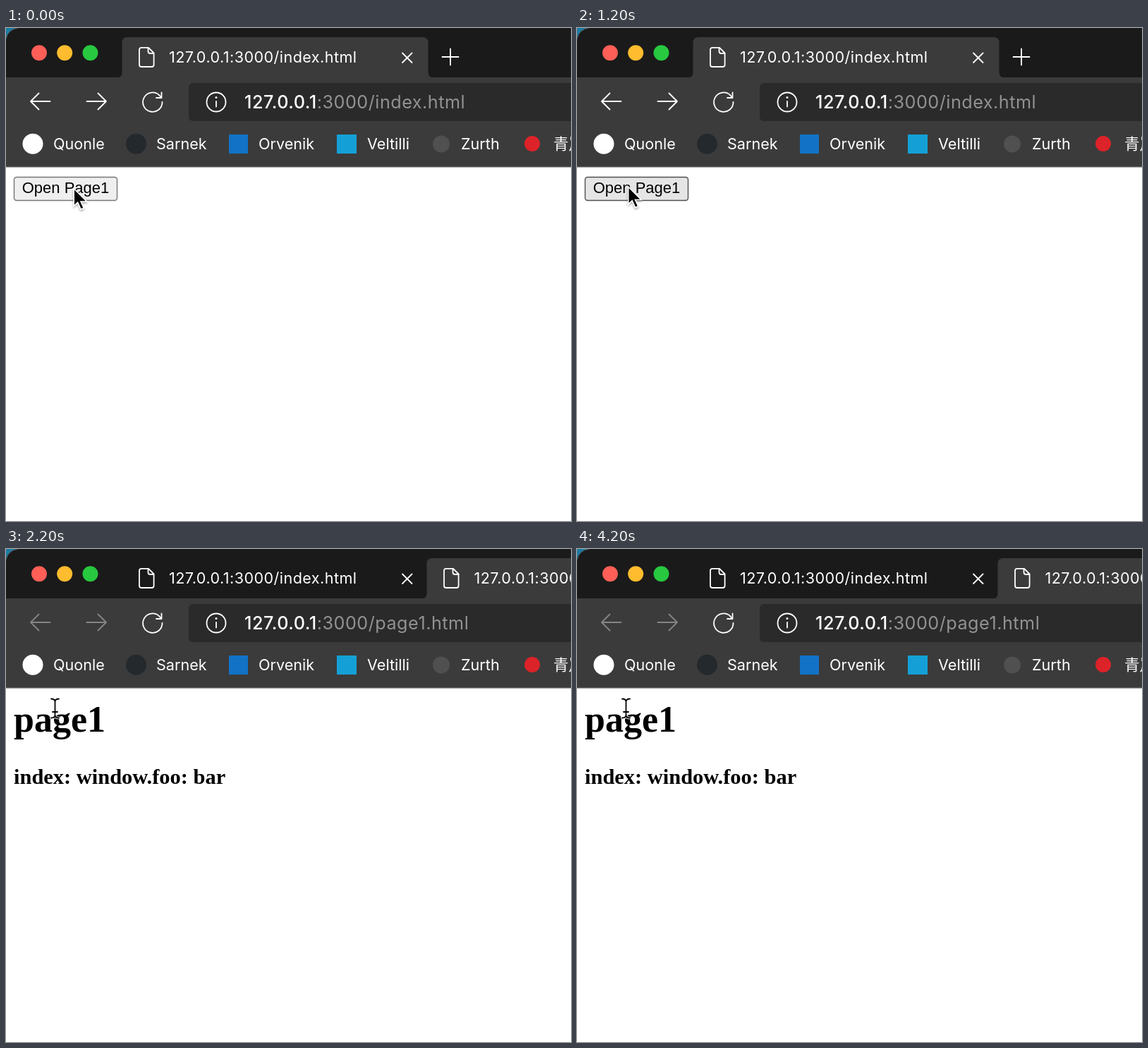
Write an HTML page that moves like this. It is 801 by 699 pixels and loops after 4600 ms.

```html
<!DOCTYPE html>
<html lang="en">
<head>
<meta charset="utf-8">
<title>Opening a page in a new tab</title>
<style>
html, body { margin: 0; width: 100%; height: 100%; overflow: hidden; background: #fff; }
svg { display: block; width: 801px; height: 699px; }
.ui { font: 400 21.6px Inter, "Noto Sans CJK SC", "Noto Sans CJK", sans-serif; fill: #fff; }
.url { letter-spacing: .02em; }
.address { font-size: 25.2px; }
.doc { font-family: "Liberation Serif", serif; font-weight: 700; }
.line { fill: none; stroke: #fff; stroke-width: 1.8; stroke-linecap: round; stroke-linejoin: round; }
</style>
</head>
<body>
<svg viewBox="0 0 801 699" xmlns="http://www.w3.org/2000/svg">
  <defs>
    <path id="file" class="line" d="M192 27.800H202L209.600 35.500V52Q209.600 55 206.600 55H192Q189 55 189 52V30.800Q189 27.800 192 27.800ZM201.500 28V33Q201.500 36 204.500 36H209"/>
    <filter id="shadow" x="-50%" y="-50%" width="200%" height="200%">
      <feDropShadow dx="0" dy="2" stdDeviation="1.6" flood-opacity=".35"/>
    </filter>
  </defs>

  <!-- Window frame -->
  <rect width="20" height="20" fill="#1a7ca3"/>
  <path d="M0 70V17Q2 2 18 0H801V70Z" fill="#1a1a1a"/>
  <path d="M0 15Q3 2 17 0" fill="none" stroke="#555" stroke-width="1"/>
  <rect y="70" width="801" height="127" fill="#3b3b3b"/>
  <rect y="196.500" width="801" height="1.500" fill="#747474"/>
  <rect id="content" y="197.600" width="801" height="502" fill="#fff"/>
  <circle cx="47" cy="35.300" r="11" fill="#ff5f57"/>
  <circle cx="83.200" cy="35.300" r="11" fill="#febc2e"/>
  <circle cx="119.500" cy="35.300" r="11" fill="#28c840"/>

  <!-- Tabs -->
  <g id="firstTab">
    <path d="M158 70.500Q164.500 70 164.500 63V21Q164.500 13 172.500 13H590.500Q598.500 13 598.500 21V63Q598.500 70 605 70.500Z" fill="#3b3b3b"/>
    <path class="line" d="M618.500 41H641.500M630 29.500V52.500"/>
  </g>
  <path id="secondTab" d="M590 70.500Q596.500 70 596.500 63V21Q596.500 13 604.500 13H801V70.500Z" fill="#3b3b3b"/>
  <use href="#file"/>
  <text class="ui url" x="231" y="49">127.0.0.1:3000/index.html</text>
  <path class="line" d="M562 35.500L575.500 49M575.500 35.500L562 49"/>
  <g id="secondTitle">
    <text class="ui url" x="663.500" y="49">127.0.0.1:3000/page1.html</text>
    <use id="secondIcon" href="#file" x="432"/>
    <circle id="spinner" cx="620" cy="46.500" r="2.700" fill="#5b9fe3"/>
  </g>

  <!-- Toolbar -->
  <path id="arrows" class="line" d="M62.500 104H35M46.500 92.500L35 104L46.500 115.500M114.500 104H142M130.500 92.500L142 104L130.500 115.500"/>
  <path id="reload" class="line" d="M221.500 105A13.700 13.700 0 1 1 217.500 95.500L220 98.500M220.500 91.500V99H213"/>
  <path id="stop" class="line" d="M198.500 95.500L217.500 114.500M217.500 95.500L198.500 114.500"/>
  <rect x="259" y="78" width="560" height="54" rx="6" fill="#2a2a2a"/>
  <circle class="line" cx="298" cy="105" r="13.500"/>
  <path class="line" d="M298 104V111.500"/>
  <circle cx="298" cy="98.500" r="1.500" fill="#fff"/>
  <text class="ui url address" x="338" y="114"><tspan font-weight="500">127.0.0.1</tspan><tspan id="path" fill="#929292"></tspan></text>

  <!-- Bookmarks -->
  <circle cx="38" cy="164.300" r="14.500" fill="#fff"/>
  <circle cx="184.500" cy="164.300" r="14.500" fill="#24292e"/>
  <rect x="316" y="151" width="27" height="27" fill="#1272c6"/>
  <rect x="469" y="151" width="28" height="27" fill="#14a0d6"/>
  <circle cx="617" cy="164.500" r="12" fill="#505050"/>
  <circle cx="746" cy="164" r="11" fill="#dc2329"/>
  <g id="bookmarks" class="ui"></g>

  <!-- Start page -->
  <g id="startPage">
    <rect id="button" x="11.500" y="211.500" width="146" height="33" rx="3.500" stroke="#767676" stroke-width="1.400"/>
    <text x="84.500" y="234" font-size="22" text-anchor="middle" font-family="Liberation Sans, sans-serif">Open Page1</text>
  </g>

  <!-- Opened page -->
  <g id="newPage" class="doc">
    <text x="11" y="258.700" font-size="52">page1</text>
    <text x="11" y="333" font-size="30.450">index: window.foo: bar</text>
  </g>

  <circle id="clickRing" cx="73" cy="225" r="39.500" fill="none" stroke="#222" stroke-opacity=".8" stroke-width="2.500"/>
  <path id="arrow" d="M1.500 3.500V24.500L6.400 20L11 30L13.700 28.800L9.300 19.200H17.200Z" fill="#000" stroke="#fff" stroke-width="3" paint-order="stroke" filter="url(#shadow)"/>
  <g id="beam" fill="none" stroke-linecap="round">
    <path id="beamHalo" stroke="#fff" stroke-width="4" stroke-opacity=".8"/>
    <path id="beamLine" stroke="#000" stroke-width="1.800"/>
  </g>
</svg>
<script>
const LOOP = 4600, STEP = 200;
const HOVER = 600, CLICK = 1000, OPEN = 1400, LOADED = 1600;
const el = id => document.getElementById(id);
const show = (id, on) => el(id).setAttribute("display", on ? "inline" : "none");
const set = (id, name, value) => el(id).setAttribute(name, value);

const bookmarks = [[67, "Quonle"], [213, "Sarnek"], [358, "Orvenik"], [512, "Veltilli"], [645, "Zurth"], [776, "青岚"]];
el("bookmarks").innerHTML = bookmarks.map(([x, s]) => `<text x="${x}" y="172">${s}</text>`).join("");

const beam = "M64 212.500Q69.500 212.500 69.500 216.500Q69.500 212.500 75 212.500M69.500 216V236M64 239.500Q69.500 239.500 69.500 235.500Q69.500 239.500 75 239.500M66 231H73";
set("beamHalo", "d", beam);
set("beamLine", "d", beam);

// Pointer stops: time, x, y
const stops = [[0, 95.5, 226], [600, 76, 224], [800, 74.5, 223.5], [1000, 72.5, 223.5], [1200, 72, 223.5], [1400, 70, 223.5]];

function render(ms) {
  const t = Math.floor((ms % LOOP) / STEP) * STEP;
  const opened = t >= OPEN, loaded = t >= LOADED, loading = opened && !loaded;
  const pressed = t === CLICK, hovered = t >= HOVER;

  show("firstTab", !opened);
  show("secondTab", opened);
  show("secondTitle", opened);
  show("secondIcon", loaded);
  show("spinner", loading);
  show("reload", !loading);
  show("stop", loading);
  show("startPage", !opened);
  show("newPage", loaded);
  show("clickRing", pressed);
  show("arrow", !loaded);
  show("beam", loaded);

  el("arrows").style.stroke = opened ? "#858585" : "#fff";
  el("path").textContent = opened ? ":3000/page1.html" : ":3000/index.html";
  set("content", "fill", loading ? "#323232" : "#fff");
  set("button", "fill", pressed ? "#f5f5f5" : hovered ? "#e5e5e5" : "#efefef");
  set("button", "stroke", pressed ? "#8d8d8d" : hovered ? "#4f4f4f" : "#767676");

  const [, x, y] = stops.filter(s => s[0] <= t).pop();
  set("arrow", "transform", `translate(${x} ${y})`);
}

const start = performance.now();
function tick() {
  render(performance.now() - start);
  requestAnimationFrame(tick);
}
tick();
</script>
</body>
</html>
```
